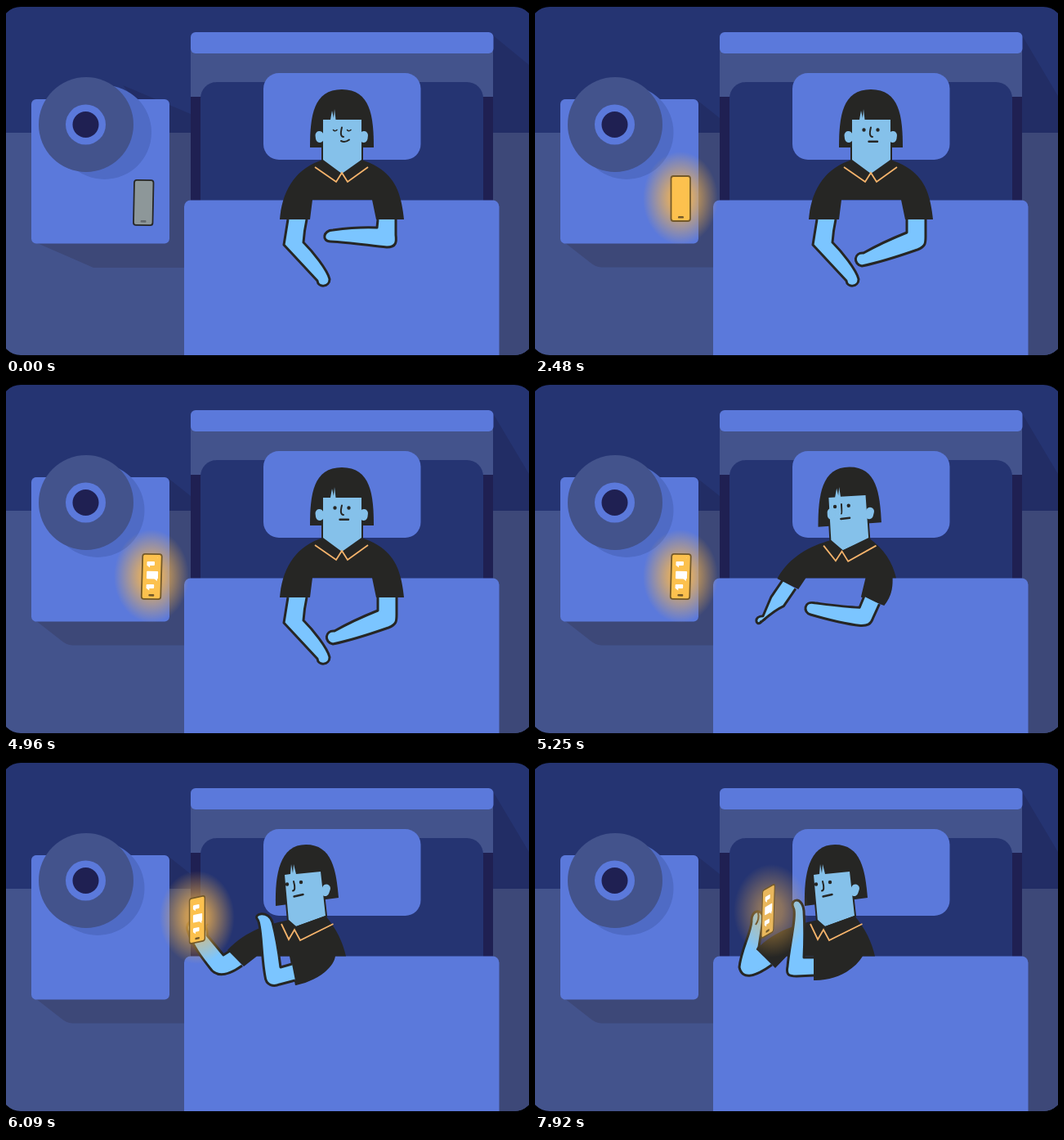
These frames come from a looping animation (640x428 px, 8 s). An HTML page:

```html
<!DOCTYPE html>
<html lang="en">
<head>
<meta charset="utf-8">
<title>Late night messages</title>
<style>
  html, body { margin: 0; width: 100%; height: 100%; overflow: hidden; background: #000; }
  svg { display: block; width: 100vw; height: 100vh; }
  .wall { fill: #253472; }
  .floor { fill: #43538c; }
  .blue { fill: #5b79db; }
  .dark { fill: #1f2052; }
  .ink { fill: #262624; }
  .line { fill: none; stroke: #262624; stroke-width: 2; stroke-linecap: round; }
  .arm { fill: #7bc5ff; stroke: #262624; stroke-width: 3; stroke-linejoin: round; }
  .skin { fill: #85c1ea; }
</style>
</head>
<body>
<svg viewBox="0 0 640 428" preserveAspectRatio="none">
  <defs>
    <clipPath id="stage"><rect x="-6" y="1" width="652" height="426" rx="24"/></clipPath>
    <clipPath id="screen"><rect x="-10" y="-23" width="20" height="43"/></clipPath>
    <radialGradient id="light">
      <stop offset="0" stop-color="#fcb84a" stop-opacity=".9"/>
      <stop offset=".3" stop-color="#fcb84a" stop-opacity=".78"/>
      <stop offset="1" stop-color="#fcb84a" stop-opacity="0"/>
    </radialGradient>
  </defs>
  <g clip-path="url(#stage)">
    <!-- room -->
    <rect class="wall" width="640" height="155"/>
    <rect class="floor" y="155" width="640" height="273"/>
    <g fill="#0f0a00" fill-opacity=".0">
    </g>
    <path id="wallShade" fill="#222d65"/>
    <path id="floorShade" fill="#3d4878"/>
    <rect x="596" y="155" width="44" height="273" fill="#3d4878"/>

    <!-- bedside table and lamp -->
    <rect class="blue" x="31" y="114" width="169" height="176.500" rx="6"/>
    <circle id="lampShade" cy="154.500" r="57.500" fill="#4f6bc5"/>
    <circle class="floor" cx="98" cy="145" r="58"/>
    <circle class="blue" cx="97.500" cy="145" r="24.500"/>
    <circle class="dark" cx="97.500" cy="145" r="16"/>

    <!-- bed -->
    <rect class="dark" x="226" y="108" width="370" height="140"/>
    <rect class="floor" x="226" y="45" width="370" height="66"/>
    <rect class="blue" x="226" y="32" width="370.500" height="26" rx="6"/>
    <rect class="wall" x="238" y="93" width="346" height="170" rx="20"/>
    <rect class="blue" x="315" y="82" width="192.500" height="106" rx="19"/>
    <rect class="blue" x="218" y="237.500" width="385.500" height="210" rx="8"/>

    <!-- woman -->
    <path id="reachArm" class="arm"/>
    <path id="thumb" class="line" style="stroke-linecap:butt"/>
    <path id="hair" class="ink"/>
    <path id="face" class="skin" stroke="#262624" stroke-width="4" paint-order="stroke"/>
    <path id="ears" fill="none" stroke="#85c1ea" stroke-width="10" stroke-linecap="round"/>
    <path id="nose" class="line"/>
    <g id="awake">
      <path id="eyes" class="line" style="stroke-width:4.400"/>
      <path id="mouth" class="line" style="stroke-width:2.400"/>
    </g>
    <g id="asleep" class="line">
      <path d="M400.500 151.500q2 2.500 4.500 0M417.500 151.500q2 2.500 4.500 0" stroke-width="1.600"/>
      <path d="M410 165Q415 167.500 420 163.500"/>
    </g>
    <path id="shirt" class="ink"/>
    <path id="collar" fill="none" stroke="#f5b36b" stroke-width="1.800"/>
    <path id="restArm" class="arm"/>

    <!-- phone -->
    <ellipse id="glow" rx="46" ry="57" fill="url(#light)"/>
    <g id="phone">
      <rect id="shell" x="-11.500" y="-27.500" width="23.500" height="55" rx="3" stroke-width="1.800"/>
      <g id="chat" clip-path="url(#screen)"><g id="bubbles" fill="#fff"></g></g>
      <rect id="button" x="-3" y="21.500" width="7" height="2.600" rx="1.200"/>
    </g>
  </g>
</svg>
<script>
const LOOP = 8000, WAKE = 1760, BUZZ = 2930, CALM = 4640;
const $ = id => document.getElementById(id);
const clamp = v => Math.max(0, Math.min(1, v));
const ramp = (t, a, b) => clamp((t - a) / (b - a));
const smooth = p => p * p * (3 - 2 * p);

// blends two strings that hold the same sequence of numbers
const NUM = /-?\d*\.?\d+/g;
function blend(a, b, p) {
  const to = b.match(NUM);
  let i = 0;
  return a.replace(NUM, n => +(+n + (to[i++] - n) * p).toFixed(3));
}

// asleep, awake, still awake, reaching, grabbing, lifting, reading
const TIMES = [1700, 1850, 4960, 5460, 5740, 6090, 6560];
const EASE = [smooth, smooth, smooth, smooth, p => p * p * (2 - p), p => p * (2 - p)];
function poseAt(keys, t) {
  let i = 0;
  while (i < TIMES.length - 2 && t >= TIMES[i + 1]) i++;
  return blend(keys[i], keys[i + 1], EASE[i](ramp(t, TIMES[i], TIMES[i + 1])));
}
// expands lying, reaching, lifting, reading to all key times
const four = (lie, reach, lift, read = lift) => [lie, lie, lie, reach, reach, lift, read];

const paths = {
  hair: four(
    'M372 173C372 135 376 102 411 102C446 102 450 135 450 173Z',
    'M331 176C331 137 335 101 369 101C401 101 405 132 408 167Z',
    'M330 176C329 137 335 101 367 101C399 101 404 132 407 166Z'),
  face: four(
    'M388 139L397 139L399 128L401 137L402 126L403.500 139L435 139L435 192L411 205L388 192Z',
    'M342 139L349 138L351 127L353 136L354 126L356 137L386 134L392 188L356 202L347 195Z',
    'M341 138L348 137L349 125L351 136L352 125L355 137L385 134L391 188L355 201L346 195Z'),
  ears: four(
    'M383.500 158L384 162M438 158L437.500 162',
    'M350 156L350 160M393 154.500L391.500 159',
    'M349 156L349 160M392 154.500L390.500 159'),
  nose: four('M411 148.500Q408 160 413 160', 'M353 146Q356 157 352 157.500', 'M352 146Q355 157 351 157.500'),
  eyes: four('M402.500 151.500L402.510 151.500M419.500 151.500L419.510 151.500',
    'M345.500 149L345.510 149M362 147L362.010 147',
    'M344 149.500L344.010 149.500M361 147L361.010 147'),
  mouth: four('M408.500 165.700L419 165.700', 'M353.500 164.500L364.500 162.500', 'M352.500 164.500L363.500 162'),
  collar: four('M378 197L404 215L411 204L418 215L443 197',
    'M338 198L346 217L354 205L362 218L402 198',
    'M337 198L346 217L353 205L360 218L400.500 198'),
  shirt: four(
    'M388 188C355 198 338 225 335 261L372 261L375 237L448 237L453 261L487 261C486 252 485 245 483 237L483 237C478 215 465 198 435 188L411 205Z',
    'M347 193C325 198 295 203 273 224L292 245L305 237.500L378 237.500L366 260L391 277C408 262 409 248 410 237.500L417 237.500C413 220 405 205 392 188L356 202Z',
    'M346 193C320 199 295 205 271 230L291 250L307 237.500L347 237.500L354 273L355 273C380 268 401 252 403 237.500L416 237.500C412 220 405 205 391 188L355 201Z',
    'M346 193C320 199 295 205 271 229L294 252L308 237.500L341 237.500L341 267L343 267C368 267 390 255 401 237.500L416 237.500C412 220 405 205 391 188L355 201Z'),
  reachArm: four(
    'M345 261L340 292L381 336C382 345 396 344 396 334C393 322 375 300 364 289Q365 275 368 261',
    'M277 228L258 241L217 252C197 247 194 267 203 266C213 267 240 264 268 261Q279 253 289 244',
    'M274 231L266 236L246 212C248 190 217 188 222 206C228 225 240 240 252 255Q264 267 289 249',
    'M272 230L274 226L279 193C280 178 264 180 265 195C264 210 252 230 250 251Q255 273 290 248'),
  thumb: four('M390 336Q390 336 390 336', 'M205 263Q212 263 217 257',
    'M247 198Q238 206 236 216', 'M273 184Q275 192 270 199'),
  restArm: four(
    'M455 261L455 277C435 285 418 293 402 302C390 301 389 316 400 318C425 313 445 306 468 298C478 294 478 290 478 282L478 261',
    'M371 259L362 271C345 265 325 256 306 247C292 243 290 257 299 260C318 273 335 285 356 294C364 297 370 296 374 290L387 274',
    'M350 247L336 251C334 235 331 215 326 196C322 181 301 185 308 193C313 200 312 235 317 262C318 274 328 275 335 272L354 267',
    'M341 239L329 239C330 220 330 200 329 182C327 163 311 168 316 178C321 185 311 225 309 250C307 260 310 262 320 262L341 261'),
};
paths.restArm[0] = 'M455 261L454 271C435 270 415 272 400 274C388 274 386 288 397 288C420 289 445 293 466 295C478 295 478 288 477 280L477 261';
paths.reachArm[4] = 'M277 228L258 241L200 246C180 241 177 261 186 261C197 262 238 263 267 260Q279 253 289 244';
paths.thumb[4] = 'M188 257Q195 257 200 251';

const wallShade = [
  'M143 97L226 132L226 155L190 155ZM596 36L640 72L640 155L596 155Z',
  'M197 114L226 137L226 155L190 155ZM596 36L640 110L640 155L596 155Z'];
const floorShade = [
  'M190 155L230 155L230 320L107 320L36 289Z',
  'M190 155L230 155L230 319.500L81 319.500Q74 319 68 314L36 289Z'];

const flat = 'matrix(1 0 0 1 178 235.500)';
const tilted = 'matrix(1 0.02 -0.03 1 178 235.500)';
const phoneKeys = ['matrix(1 0.01 -0.02 1 168 240.500)', flat, tilted, tilted, tilted,
  'matrix(.8 -.17 0 1 233.500 193)', 'matrix(.63 -.36 -.03 1.06 285 182.500)'];
const glowKeys = four('178 235 1', '178 235 1', '233.500 190 .92', '289 182 .6');
const shellKeys = four('rgb(252,193,78)', 'rgb(252,193,78)', 'rgb(252,193,78)', 'rgb(233,183,92)');

// chat messages, large and small in turn
const STEP = 14;
$('bubbles').innerHTML = Array.from({ length: 9 }, (_, k) => {
  const [w, h] = k % 2 ? [9.500, 5] : [14, 9.500];
  const tail = k % 2 ? -3 : 4;
  return `<g transform="translate(-6 ${k * STEP - 15})"><rect y="${-h / 2}" width="${w}" height="${h}" rx="1"/>` +
    `<path d="M${w / 2 + tail - 2} ${h / 2 - .5}h4v3z"/></g>`;
}).join('');

function phoneMatrix(t) {
  if (t < TIMES[1]) return t < WAKE ? phoneKeys[0] : flat;
  if (t < BUZZ) return flat;
  if (t >= CALM) return poseAt(phoneKeys, Math.max(t, TIMES[2]));
  const n = Math.floor((t - BUZZ) / 80);
  const tilt = (n % 3 - 1) * .025;
  return `matrix(1 ${tilt} ${-tilt} 1 178 ${235.500 + (n % 2 ? 0 : 2)})`;
}

function draw(t) {
  for (const id in paths) $(id).setAttribute('d', poseAt(paths[id], t));

  const lit = t >= WAKE;
  $('awake').style.display = lit ? '' : 'none';
  $('asleep').style.display = lit ? 'none' : '';
  $('wallShade').setAttribute('d', wallShade[+lit]);
  $('floorShade').setAttribute('d', floorShade[+lit]);
  $('lampShade').setAttribute('cx', lit ? 112 : 120.500);

  const [x, y, power] = poseAt(glowKeys, t).split(' ');
  $('glow').setAttribute('cx', x);
  $('glow').setAttribute('cy', y);
  $('glow').style.opacity = lit ? power : 0;

  $('phone').setAttribute('transform', phoneMatrix(t));
  $('shell').style.fill = lit ? poseAt(shellKeys, t) : '#8d9799';
  $('shell').style.stroke = lit ? '#73592a' : '#262624';
  $('button').style.fill = lit ? '#73592a' : '#62696d';

  $('chat').style.display = t < BUZZ ? 'none' : '';
  const scroll = -42 * (1 - ramp(t, BUZZ, 3680)) + 43 * ramp(t, 3760, 4560) +
    28 * smooth(ramp(t, 7200, 7680));
  $('bubbles').setAttribute('transform', `translate(0 ${-scroll})`);

  const swipe = -2.500 * Math.sin(Math.PI * ramp(t, 7200, 7680));
  $('restArm').setAttribute('transform', `rotate(${swipe} 320 260)`);
}

function tick() {
  draw(performance.now() % LOOP);
  requestAnimationFrame(tick);
}
tick();
</script>
</body>
</html>
```
